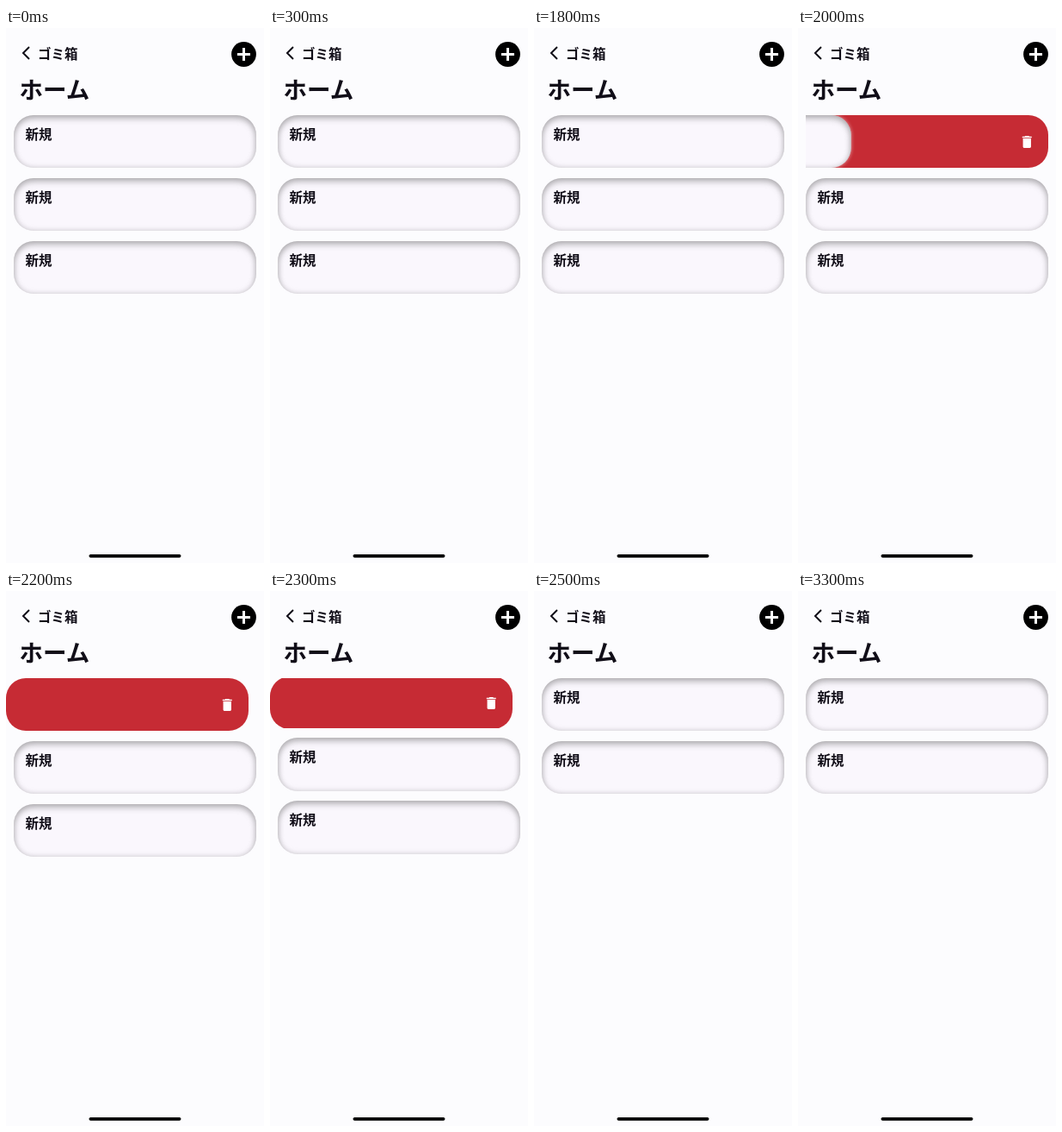
An HTML page that plays this animation: 300 px wide and 620 px high, repeating every 3.5 s.

```html
<!DOCTYPE html>
<html lang="ja">
<head>
<meta charset="utf-8">
<style>
  html, body { margin: 0; width: 100%; height: 100%; overflow: hidden; background: #fcfcfe; }
  #stage { position: relative; width: 300px; height: 620px; overflow: hidden; }
  #stage > svg { position: absolute; left: 0; top: 0; }
  text { font-family: "Noto Sans CJK JP", "Noto Sans CJK", "Noto Sans", sans-serif; font-weight: 700; fill: #110e18; }
  .slot { position: absolute; left: 9.2px; width: 281.7px; height: 61.5px; overflow: hidden; }
  .tray, .card { position: absolute; left: 0; top: 0; width: 281.7px; height: 61.5px; border-radius: 23px; }
  .tray > svg { position: absolute; left: 0; top: 0; }
  .card {
    background: #faf7fd;
    box-shadow: inset 0 4px 7px rgba(95, 95, 95, .4), inset 0 0 6px rgba(160, 155, 160, .42),
      0 0 4px rgba(252, 250, 254, .6);
  }
  .card svg { display: block; }
</style>
</head>
<body>
<div id="stage">
  <svg width="300" height="620">
    <path d="M27 22L20 29L27 36" fill="none" stroke="#110e18" stroke-width="2"/>
    <text x="37" y="35.8" font-size="15.5">ゴミ箱</text>
    <text x="15.6" y="81.7" font-size="27.5">ホーム</text>
    <circle cx="276.5" cy="30.5" r="14.4"/>
    <path d="M269 30.5H284M276.5 23V38" stroke="#fff" stroke-width="3"/>
    <rect x="96.5" y="609.9" width="107" height="3.9" rx="1.95"/>
  </svg>
</div>
<script>
const LOOP = 3500, STEP = 100;
const LEFT = 9.2, TOP = 100.6, HEIGHT = 61.5, PITCH = 73;
const RED = '#c62b34';
const stage = document.getElementById('stage');

const trash = `<svg width="282" height="61"><path fill="#fff" transform="translate(247.9 21.6) scale(.78)"
  d="M6 19c0 1.1.9 2 2 2h8c1.1 0 2-.9 2-2V7H6zM19 4h-3.5l-1-1h-5l-1 1H5v2h14z"/></svg>`;
const label = `<div class="card"><svg width="281" height="61">
  <text x="13.6" y="28.2" font-size="15.5">新規</text></svg></div>`;

const slots = [0, 1, 2].map(i => {
  const slot = document.createElement('div');
  slot.className = 'slot';
  slot.innerHTML = `<div class="tray">${i ? '' : trash}${label}</div>`;
  stage.append(slot);
  return slot;
});
const tray = slots[0].firstChild;
const card = tray.querySelector('.card');
const bin = tray.firstChild;

const clamp = v => Math.min(1, Math.max(0, v));
const smooth = v => v * v * (3 - 2 * v);

// Card swipe: slow pull, then a fling off the left edge
function swipe(t) {
  const p = clamp((t - 1800) / 200);
  return -229.3 * Math.pow(p, 1.2) - 70 * clamp((t - 2000) / 80);
}

function draw(t) {
  const x = swipe(t);
  const settled = t >= 2160;
  const gone = t >= 2460;
  const h = HEIGHT * (1 - smooth(clamp((t - 2274) / 180)));
  const shift = gone ? PITCH : HEIGHT - h;

  slots[0].style.display = gone ? 'none' : 'block';
  slots[0].style.left = (settled ? 0 : LEFT) + 'px';
  slots[0].style.height = h + 'px';
  tray.style.top = (h - HEIGHT) / 2 + 'px';
  // The red backing reaches only as far left as the card's rounded end
  const edge = settled ? 0 : Math.max(0, 281.7 + x - 24);
  tray.style.background = x < 0 ? `linear-gradient(90deg, transparent ${edge}px, ${RED} ${edge}px)` : 'none';
  bin.style.display = x < 0 ? 'block' : 'none';
  card.style.transform = `translateX(${x}px)`;
  card.style.visibility = settled ? 'hidden' : 'visible';
  slots.forEach((s, i) => {
    s.style.top = TOP + PITCH * i - (i ? shift : 0) + 'px';
  });
}

const start = performance.now();
function tick() {
  const t = (performance.now() - start) % LOOP;
  draw(Math.floor(t / STEP) * STEP);
  requestAnimationFrame(tick);
}
draw(0);
requestAnimationFrame(tick);
</script>
</body>
</html>
```
